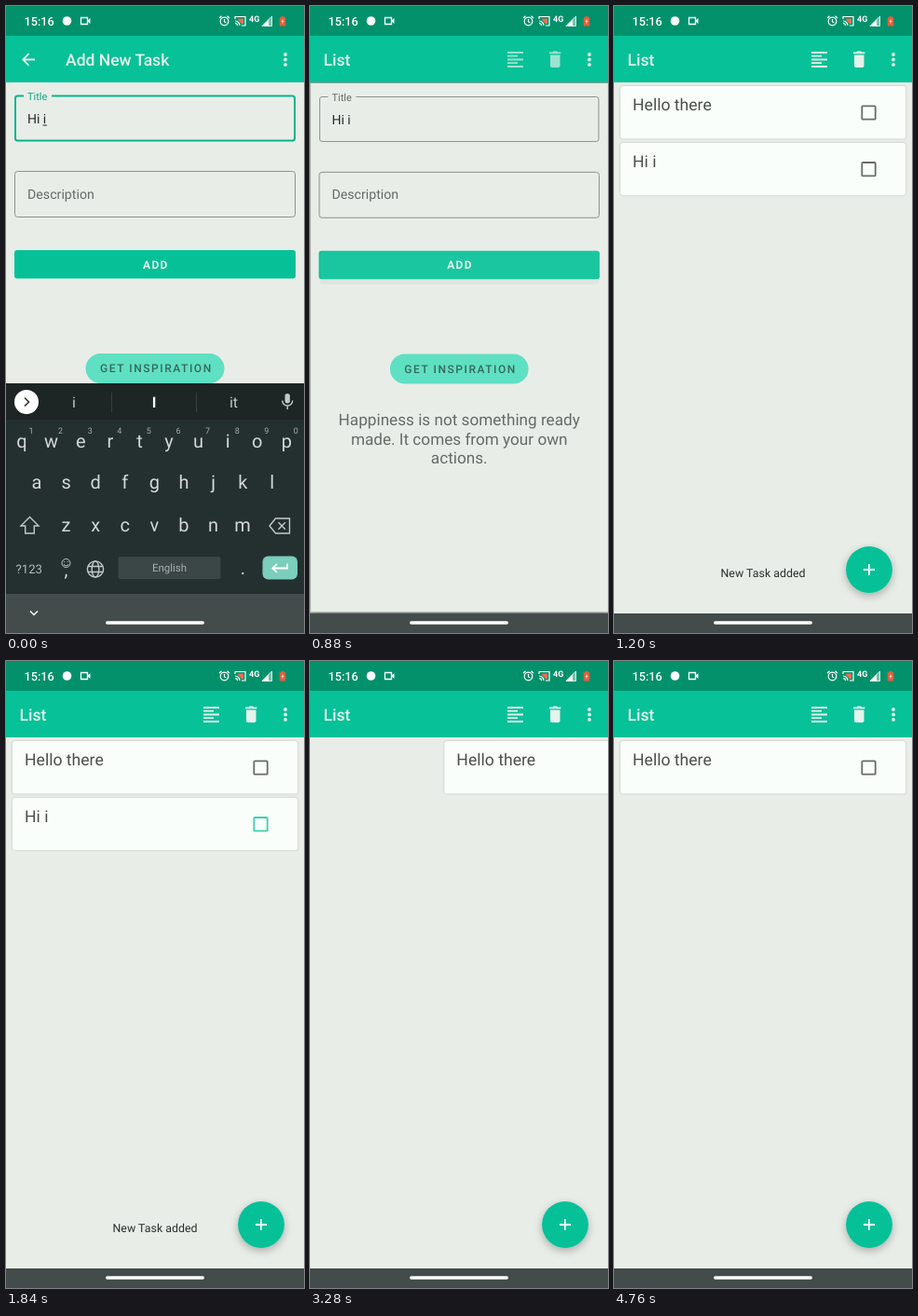
Write an HTML page that moves like this. It is 320 px wide and 673 px high and loops after 6 s.

```html
<!DOCTYPE html>
<html lang="en">
<head>
<meta charset="utf-8">
<title>Task list</title>
<style>
html, body { margin: 0; width: 100%; height: 100%; overflow: hidden; background: #e9ede8; }
svg { display: block; width: 320px; height: 673px; font-family: Roboto, sans-serif; text-rendering: geometricPrecision; }
.mid { text-anchor: middle; }
.line { fill: none; stroke: #e4f3ec; stroke-width: 1.8; }
.key { fill: #d3d8d7; text-anchor: middle; font-size: 20px; }
.hint { fill: #a5acab; text-anchor: middle; font-size: 9px; }
.card { filter: drop-shadow(0 .7px 1px #0003); }
.box { fill: none; stroke: #686d6a; stroke-width: 1.8; }
#sheet { filter: drop-shadow(0 3px 4px #0004); }
#snack { filter: drop-shadow(0 1px 2px #0005); transform-origin: 160px 623px; }
</style>
</head>
<body>
<svg viewBox="0 0 320 673">
  <clipPath id="mask"><rect id="hole"/></clipPath>
  <rect width="320" height="673" fill="#e9ede8"/>

  <g id="list">
    <g id="first" class="card">
      <rect x="7" y="86" width="306" height="56.5" rx="3" fill="#fafefa"/>
      <text x="20" y="112" font-size="17.6" fill="#4a4f4c">Hello there</text>
      <rect class="box" x="266.3" y="107.3" width="14.4" height="14.4" rx="1"/>
    </g>
    <g id="second" class="card">
      <rect x="7" y="147" width="306" height="56" rx="3" fill="#fafefa"/>
      <text x="20" y="172.5" font-size="17.6" fill="#4a4f4c">Hi i</text>
      <rect id="check" class="box" x="266.3" y="168" width="14.4" height="14.4" rx="1"/>
      <g id="tick">
        <rect x="265.4" y="167.1" width="16.2" height="16.2" rx="2" fill="#06c197"/>
        <path d="M269 175.500l3.300 3.300 6.200-6.500" fill="none" stroke="#fafefa" stroke-width="1.8"/>
      </g>
    </g>
  </g>
  <rect id="scrim" y="82" width="320" height="570"/>

  <g id="sheet"><g clip-path="url(#mask)">
    <rect width="320" height="673" fill="#e9ede8"/>
    <g id="form">
      <path id="frame" d="M19 96.500H12.500a2.500 2.500 0 0 0-2.500 2.500V142a2.500 2.500 0 0 0 2.500 2.500H307.500a2.500 2.500 0 0 0 2.500-2.500V99a2.500 2.500 0 0 0-2.500-2.500H49" fill="none"/>
      <text id="label" x="23" y="101" font-size="11">Title</text>
      <text x="23" y="126" font-size="14" fill="#252a27">Hi i</text>
      <path id="under" d="M39.500 128h4.500" stroke="#252a27"/>
      <path id="caret" d="M44.600 111v19" stroke="#06b58e" stroke-width="1.500"/>
      <rect x="9.500" y="177.500" width="301" height="49" rx="3" fill="none" stroke="#8d928e"/>
      <text x="23" y="206.500" font-size="14.2" fill="#666b67">Description</text>
      <rect id="lift" x="10" y="265" width="300" height="33" rx="3" fill="#ccd4ce"/>
      <rect x="9" y="262" width="302" height="30.500" rx="3" fill="#06c197"/>
      <rect id="press" x="10.500" y="262" width="300.500" height="30.500" rx="3" fill="#fff"/>
      <text x="147" y="281.700" font-size="12" font-weight="700" letter-spacing="1.3" fill="#e6f6ef">ADD</text>
      <rect x="85.500" y="373" width="149" height="32" rx="16" fill="#5fe0c3"/>
      <text x="101" y="393.300" font-size="12" letter-spacing="1.55" fill="#37675b" font-weight="500">GET INSPIRATION</text>
      <g class="mid" font-size="17.200" fill="#666b67">
        <text x="160" y="450">Happiness is not something ready</text>
        <text x="160" y="470.500">made. It comes from your own</text>
        <text x="160" y="491">actions.</text>
      </g>
    </g>
    <g id="fab">
      <rect width="320" height="673" fill="#06c197"/>
      <path id="plus" d="M-6 0H6M0-6V6" stroke="#fff" stroke-width="1.900"/>
    </g>
  </g></g>

  <rect width="320" height="32" fill="#02916b"/>
  <rect y="32" width="320" height="50" fill="#07c198"/>
  <g fill="#fff">
    <text x="19.500" y="21" font-size="12.700" font-weight="500">15:16</text>
    <circle cx="65.500" cy="16" r="4.800"/>
    <path d="M80.500 12.500h7v7h-7z" fill="none" stroke="#fff" stroke-width="1.300"/>
    <path d="M87.500 15.500l3-2.500v6l-3-2.500z"/>
    <g fill="none" stroke="#fff" stroke-width="1.200">
      <circle cx="234.500" cy="16.500" r="4.300"/>
      <path d="M234.500 14v3l2 1M229 13l2.500-2.200M240 13l-2.500-2.200"/>
      <path d="M246 14v-2.500h11V21h-4"/>
      <path d="M246 16a5 5 0 0 1 5 5M246 18.500a2.500 2.500 0 0 1 2.500 2.500"/>
    </g>
    <path d="M249 13.500h6v5.500h-2.500a7 7 0 0 0-3.500-4z" fill="#e8704f"/>
    <text x="261" y="17" font-size="9" font-weight="700">4G</text>
    <path d="M285.500 11v10.500h-10.500z" fill-opacity=".45"/>
    <path d="M282 14.500v7h-7z"/>
    <path d="M285.500 11v10.500h-10.500z" fill="none" stroke="#fff" stroke-width=".8"/>
    <path d="M295.500 11h3v1.300h1.800v9.200h-6.600v-9.200h1.800z" fill="#e2603f"/>
    <path d="M295.800 16.500h2.600M297 14.500v4" stroke="#ffd9cc"/>
  </g>
  <g fill="#e4f3ec">
    <path id="back" class="line" d="M31 57.500H18.500M24.500 51.200l-6.300 6.300 6.300 6.300"/>
    <text id="title" y="64" font-size="17.500" font-weight="500"></text>
    <g id="tools">
      <path class="line" d="M212 50h17M212 53.700h11M212 57.500h17M212 61.200h11M212 65h17"/>
      <path d="M257 51.300v-1.700h3.300l1-1h3.800l1 1h3.300v1.700zM258 52.500h10.500v11.700a1.800 1.800 0 0 1-1.800 1.800h-6.900a1.800 1.800 0 0 1-1.800-1.800z"/>
    </g>
    <circle cx="300" cy="52" r="1.900"/><circle cx="300" cy="57.500" r="1.900"/><circle cx="300" cy="63" r="1.900"/>
  </g>

  <rect y="652" width="320" height="21" fill="#434c4b"/>
  <g id="board">
    <rect y="405" width="320" height="40" fill="#1d2525"/>
    <rect y="444" width="320" height="187" fill="#243030"/>
    <rect y="631" width="320" height="42" fill="#434c4b"/>
    <circle cx="22" cy="425" r="13" fill="#fff"/>
    <path d="M20 420.500l4.500 4.500-4.500 4.500" fill="none" stroke="#333" stroke-width="1.600"/>
    <path d="M113.500 415v21M204.500 415v21" stroke="#364040"/>
    <g class="mid" font-size="16" fill="#c3c9c8">
      <text x="73" y="431">i</text>
      <text x="159" y="431" font-weight="700" fill="#fff">I</text>
      <text x="244.500" y="431">it</text>
    </g>
    <rect x="299.500" y="416" width="5.400" height="10.500" rx="2.700" fill="#c3c9c8"/>
    <g id="keys" fill="none" stroke="#c3c9c8" stroke-width="1.400">
      <path d="M296.700 423.500a5.500 5.500 0 0 0 11 0M302.200 429v4"/>
      <path d="M25.500 548.500l-9.500 9.500h4.700v8h9.600v-8h4.700z"/>
      <path d="M289.500 550H304.500v16H289.500l-6.500-8zM292.500 554.300l7.400 7.400M299.900 554.300l-7.400 7.400"/>
      <circle cx="64.500" cy="598" r="4.500" stroke-width="1"/>
      <path d="M62 599a2.600 2.600 0 0 0 5 0M62.700 596v1M66.300 596v1" stroke-width="1"/>
      <circle cx="96" cy="604.500" r="8.600"/>
      <ellipse cx="96" cy="604.500" rx="3.800" ry="8.600"/>
      <path d="M88 601.500h16M88 607.500h16"/>
    </g>
    <rect x="120.500" y="591" width="110" height="24" rx="2" fill="#3b4646"/>
    <text class="mid" x="175.500" y="607" font-size="11.500" fill="#a9b0af">English</text>
    <text x="10.500" y="609" font-size="13.200" fill="#b4bbba">?123</text>
    <text class="key" x="64.500" y="612">,</text>
    <text class="key" x="254.500" y="610">.</text>
    <rect x="275.500" y="590.500" width="37.500" height="25" rx="6" fill="#7bcdbc"/>
    <path d="M302 598.500v5H286.500M291 598.800l-4.700 4.700 4.700 4.700" fill="none" stroke="#fff" stroke-width="1.800"/>
    <path id="chevron" d="M26 649.500l4 4 4-4" fill="none" stroke="#fff" stroke-width="1.500"/>
  </g>
  <rect x="107" y="660.200" width="106" height="3.600" rx="1.800" fill="#fff"/>

  <g id="toast">
    <rect x="93" y="587" width="134" height="43" rx="20" fill="#e9ede8"/>
    <text class="mid" x="160" y="613.300" font-size="12.400" fill="#2c302d">New Task added</text>
  </g>
  <g id="snack">
    <rect x="7" y="602" width="306" height="42.500" rx="3" fill="#2b302c"/>
    <text x="21" y="628" font-size="13" fill="#dfe3df">Deleted Hello there</text>
    <text x="261" y="628" font-size="12" font-weight="500" letter-spacing="1.500" fill="#70dfc5">UNDO</text>
  </g>
</svg>
<script>
const $ = id => document.getElementById(id);
const ramp = (t, a, b) => Math.min(1, Math.max(0, (t - a) / (b - a)));
const mix = (a, b, k) => a + (b - a) * k;
const set = (id, attrs) => { for (const k in attrs) $(id).setAttribute(k, attrs[k]); };
const fade = (id, a) => set(id, { opacity: a, display: a > 0 ? 'inline' : 'none' });

// cubic-bezier(.4, 0, .2, 1)
function ease(x) {
  let lo = 0, hi = 1;
  for (let i = 0; i < 24; i++) {
    const s = (lo + hi) / 2, r = 1 - s;
    if (1.2 * r * r * s + .6 * r * s * s + s * s * s < x) lo = s; else hi = s;
  }
  return 3 * (1 - lo) * lo * lo + lo * lo * lo;
}

let keys = '';
[['qwertyuiop', 17, 474], ['asdfghjkl', 33, 518], ['zxcvbnm', 64.5, 564]].forEach(([row, x0, y], r) =>
  [...row].forEach((c, i) => {
    const x = x0 + i * 31.6;
    keys += `<text class="key" x="${x}" y="${y}">${c}</text>`;
    if (!r) keys += `<text class="hint" x="${x + 10}" y="459">${(i + 1) % 10}</text>`;
  }));
$('keys').insertAdjacentHTML('afterend', keys);

// The form shrinks into the round button
function drawSheet(t) {
  const p = ease(ramp(t, 871, 1200));
  const w = mix(320, 50, p), x = mix(160, 274, p) - w / 2, y = mix(82, 580, p), s = w / 320;
  const h = mix(569 * s, w, ramp(p, 0, .9));
  set('hole', { x, y, width: w, height: h, rx: w / 2 * ramp(p, .2, .9) });
  set('form', { transform: `translate(${x} ${y - 82 * s}) scale(${s})` });
  set('plus', { transform: `translate(${x + w / 2} ${y + h / 2}) scale(${w / 50})` });
  fade('fab', ramp(p, .6, .9));
  fade('scrim', t < 871 ? 0 : .32 * (1 - p));
}

function draw(t) {
  const typing = t < 790, adding = t < 760;
  drawSheet(t);

  set('frame', { stroke: typing ? '#06b58e' : '#8d928e', 'stroke-width': typing ? 2 : 1 });
  set('label', { fill: typing ? '#06a883' : '#666b67' });
  fade('under', +typing);
  fade('caret', +(t >= 280 && t < 780));
  const press = ramp(t, 600, 740) * (1 - ramp(t, 800, 920));
  fade('press', .24 * press);
  fade('lift', press);

  $('title').textContent = adding ? 'Add New Task' : 'List';
  set('title', { x: adding ? 64 : 14.5 });
  fade('back', +adding);
  fade('chevron', +adding);
  fade('tools', ramp(t, 800, 920));

  const slide = ramp(t, 780, 880);
  set('board', { transform: `translate(0 ${268 * slide * slide})` });
  fade('board', +(slide < 1));

  fade('toast', ramp(t, 920, 1080) * (1 - ramp(t, 2780, 2940)));
  set('check', { style: t >= 1840 ? 'stroke:#3fcfae' : '' });
  fade('tick', ramp(t, 1870, 1960));
  fade('second', 1 - ramp(t, 2000, 2150));

  const drag = 136 * Math.max(0, (t - 3080) / 200) ** 2;
  const restored = t > 4500;
  set('first', { transform: `translate(${restored ? 0 : Math.min(drag, 330)} 0)` });
  fade('first', restored ? ramp(t, 4570, 4750) : 1);

  const pop = ramp(t, 3600, 3770);
  fade('snack', pop * (1 - ramp(t, 4470, 4560)));
  $('snack').style.transform = `scale(${mix(.8, 1, ease(pop))})`;
}

const start = performance.now();
function tick() {
  draw((performance.now() - start) % 6000);
  requestAnimationFrame(tick);
}
tick();
</script>
</body>
</html>
```
